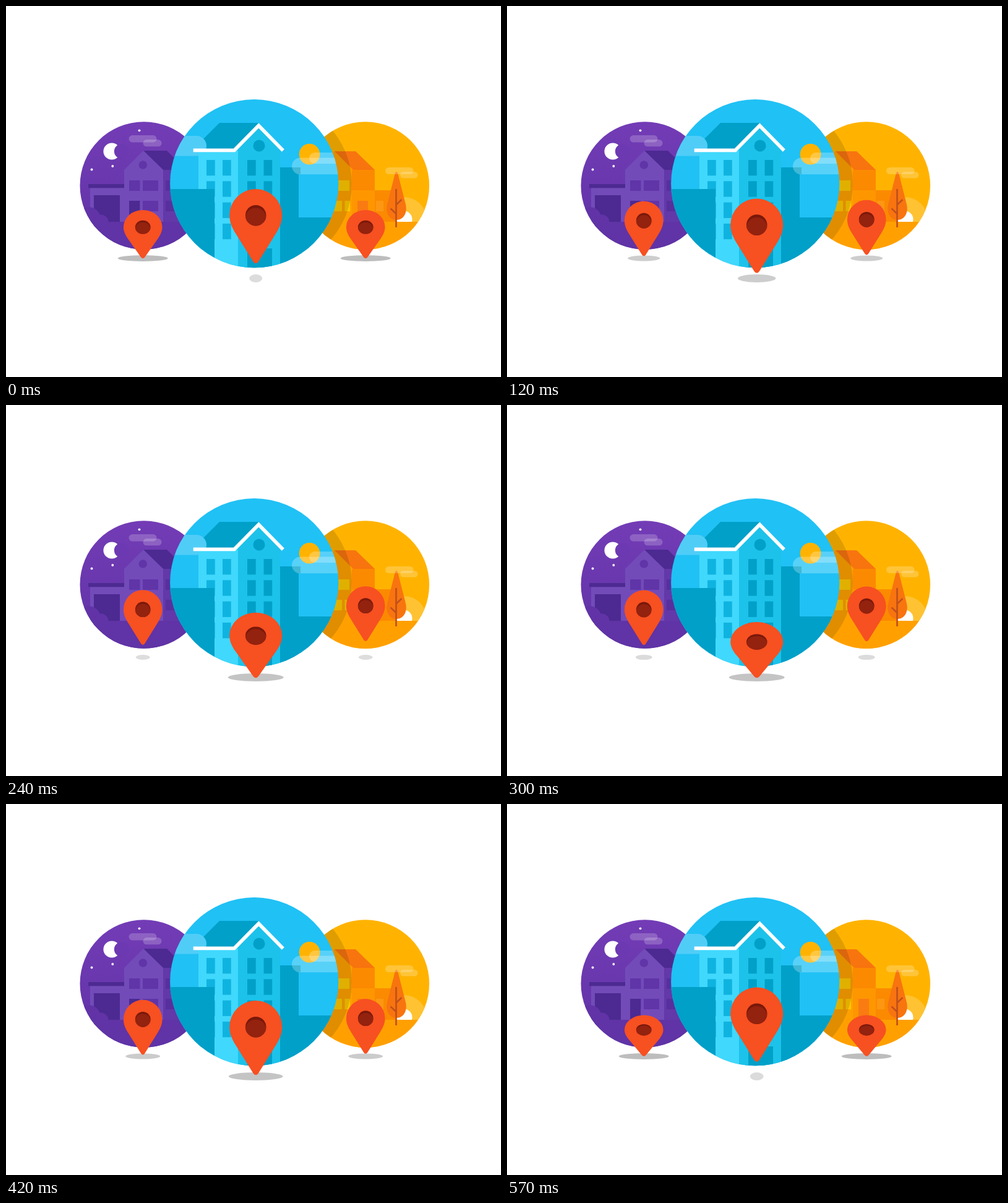
Recreate the animation shown at these times as an HTML page with a canvas. Size 800x600 px, loop 0.66 s.

```html
<!DOCTYPE html>
<html lang="en">
<head>
<meta charset="utf-8">
<title>Map pins</title>
<style>
html, body { margin: 0; width: 100%; height: 100%; overflow: hidden; background: #fff; }
canvas { display: block; width: 800px; height: 600px; }
</style>
</head>
<body>
<canvas id="stage" width="800" height="600"></canvas>
<script>
const view = document.getElementById('stage').getContext('2d');
const scene = document.createElement('canvas');
scene.width = 800;
scene.height = 600;
const c = scene.getContext('2d');

// Drawing helpers; boxes are given by their edges.
function box(x1, y1, x2, y2, color) {
  c.fillStyle = color;
  c.fillRect(x1, y1, x2 - x1, y2 - y1);
}
function disc(x, y, r, color) {
  c.fillStyle = color;
  c.beginPath();
  c.arc(x, y, r, 0, Math.PI * 2);
  c.fill();
}
function trace(pts) {
  c.beginPath();
  for (let i = 0; i < pts.length; i += 2) c.lineTo(pts[i], pts[i + 1]);
}
function poly(pts, color) {
  c.fillStyle = color;
  trace(pts);
  c.fill();
}
function line(pts, width, color) {
  c.strokeStyle = color;
  c.lineWidth = width;
  trace(pts);
  c.stroke();
}
function cloud(x, y, w, h, color) {
  c.fillStyle = color;
  c.beginPath();
  c.roundRect(x, y, w, h, h / 2);
  c.fill();
}
function inDisc(x, y, r, color, paint) {
  disc(x, y, r, color);
  c.save();
  c.beginPath();
  c.arc(x, y, r, 0, Math.PI * 2);
  c.clip();
  paint();
  c.restore();
}

function night() {
  const dark = '#4c2a91', wall = '#724bb9', pane = '#6035a8', bush = '#6133a7';
  const haze = 'rgba(255,255,255,0.2)';
  disc(171, 235, 13.6, '#fff');
  disc(186.6, 235, 11.8, '#6d39b2');
  disc(215.5, 201.3, 1.9, '#fff');
  disc(172.3, 259, 1.9, '#fff');
  disc(138.5, 264.5, 1.9, '#fff');

  box(254, 265, 330, 349, '#6338a9');
  poly([222, 234, 260, 234, 291, 265, 254, 265], dark);
  poly([191, 349, 191, 265, 222, 234, 254, 265, 254, 349], wall);
  disc(221.3, 257, 6.8, pane);
  for (const y of [282, 315]) {
    box(199, y, 216.5, y + 17, pane);
    box(221, y, 246, y + 17, pane);
    box(258, y, 276, y + 17, '#57309d');
  }
  box(199, 315, 216, 349, dark);

  box(136, 294, 191, 349, wall);
  box(133, 288, 191, 294.3, dark);
  box(142, 306, 184, 349, dark);
  disc(133, 345, 20, bush);
  disc(153.5, 349.5, 12, bush);
  box(110, 349, 330, 400, '#6033a6');

  cloud(198.5, 209, 45, 11.5, haze);
  cloud(221.5, 216, 30, 11.3, haze);
}

function autumn() {
  const roof = '#f8740f', twig = '#c0501c', glass = '#ffc800';
  const haze = 'rgba(255,255,255,0.22)';
  disc(643, 346, 37, '#ffc233');
  disc(643, 345, 13.5, '#fff');
  box(596, 298, 631, 349, '#fb8a00');
  box(598, 315, 610, 332, '#fd9712');
  poly([480, 349, 480, 265, 531, 235, 562, 265, 562, 349], '#ffa000');
  poly([531, 235, 565, 235, 596, 265, 561, 265], roof);
  box(559, 265, 596, 298, '#fb8a00');
  box(559, 298, 596, 349, '#fe9600');
  box(537, 282, 555, 299, glass);
  box(525, 315, 543, 332, glass);
  box(547.5, 315, 556, 332, glass);
  box(568, 315, 585, 349, '#f97b12');
  box(470, 349, 690, 400, '#ffa000');

  c.fillStyle = roof;
  c.beginPath();
  c.moveTo(631, 268);
  c.quadraticCurveTo(632.5, 268, 633.5, 272);
  c.lineTo(645.5, 319);
  c.bezierCurveTo(650, 335, 642, 346, 631, 346);
  c.bezierCurveTo(620, 346, 612, 335, 616.5, 319);
  c.lineTo(628.5, 272);
  c.quadraticCurveTo(629.5, 268, 631, 268);
  c.fill();
  line([630.5, 296, 630.5, 358], 2.7, twig);
  line([630.5, 321.5, 639.5, 313], 2.5, twig);
  line([630.5, 336, 621.5, 327.5], 2.5, twig);

  cloud(613, 261, 45.5, 11, haze);
  cloud(637, 268, 28.5, 10.5, haze);
  disc(423, 288, 136, 'rgba(0,0,0,0.12)');
}

function day() {
  const dark = '#00a0c8', shade = '#0fb3e0', haze = 'rgba(255,255,255,0.25)';
  poly([345, 189, 409, 189, 371, 232, 302, 232], dark);
  cloud(230, 210, 94, 32.5, '#50cdf7');
  box(311, 234, 375, 430, '#40d8fc');
  poly([375, 430, 375, 229, 409, 195, 443, 229, 443, 430], '#1cc2ea');
  for (let row = 0; row < 4; row++) {
    const y = 249 + 34.3 * row;
    for (const x of [324, 350]) box(x, y, x + 13.7, y + 25.3, shade);
    for (const x of [390, 416.5]) box(x, y, x + 13.7, y + 25.3, dark);
  }
  box(260, 296, 337, 430, dark);
  box(390, 392, 430, 430, dark);
  disc(409, 226, 9.5, dark);

  box(443, 261, 476, 272, dark);
  box(443, 271, 473, 430, dark);
  box(443, 342, 545, 430, dark);
  disc(490.5, 239.7, 16.9, '#ffb300');
  cloud(462, 245.5, 108, 26.8, haze);
  cloud(490, 237, 80, 18, haze);

  line([302.7, 233.3, 369, 233.3, 408.3, 193.4, 447.8, 233.7], 5.7, '#fff');
}

function paintScene() {
  box(0, 0, 800, 600, '#fff');
  const sky = c.createLinearGradient(0, 187, 0, 394);
  sky.addColorStop(0, '#733cb6');
  sky.addColorStop(1, '#5f32a5');
  inDisc(222.8, 290.5, 103.3, sky, night);
  inDisc(580.8, 290.6, 103.3, '#ffb300', autumn);
  inDisc(401.2, 287.2, 136.1, '#20c1f5', day);
}

const LOOP = 660, STEP = 30, LAST = 570;
const CYCLE = 625; // length of one bounce; the loop rests for what remains

// Time between t and the nearest moment mid of the bounce.
function gap(t, mid) {
  const d = Math.abs(t - mid);
  return Math.min(d, CYCLE - d);
}
// 0 to 1 as d goes from a to b, in either direction.
function ramp(d, a, b) {
  return Math.max(0, Math.min(1, (d - a) / (b - a)));
}

// Heights, squash and shadow widths all follow the distance from a key moment.
const middle = {
  x: 403.7, size: 1, floor: 441.2, shadowY: 440.5,
  lift: t => 25 * ramp(gap(t, 293), 106, 281),
  squash: t => 0.75 + 0.25 * ramp(gap(t, 300), 0, 117),
  spread: t => 45 - 34.5 * ramp(gap(t, 300), 115, 272),
  thick: () => 6.4,
  grey: w => 227 - 0.7 * w
};
function sidePin(x, height, rest) {
  return {
    x, size: 0.737, floor: 408, shadowY: 408,
    lift: t => height * ramp(gap(t, 266), rest, 32),
    squash: t => 0.75 + 0.25 * ramp(gap(t, 570), 0, 105),
    spread: t => 11.5 + 29 * ramp(gap(t, 262), 22, 262),
    thick: w => 4 + (w - 11.5) / 29,
    grey: w => 234 - 1.1 * w
  };
}
const pins = [sidePin(221.2, 20.2, 172), sidePin(581.2, 26.2, 177), middle];

function drawShadow(p, t) {
  const w = p.spread(t), g = Math.round(p.grey(w));
  view.fillStyle = `rgb(${g},${g},${g + 1})`;
  view.beginPath();
  view.ellipse(p.x, p.shadowY, w, p.thick(w), 0, 0, Math.PI * 2);
  view.fill();
}

function drawPin(p, t) {
  view.save();
  view.translate(p.x, p.floor - p.lift(t));
  view.scale(p.size, p.size * p.squash(t));

  view.fillStyle = '#f75021';
  view.beginPath();
  view.arc(0, -77.7, 42.5, Math.PI, 0);
  view.bezierCurveTo(42.5, -66, 37.5, -56, 32, -47.5);
  view.lineTo(4, -2.5);
  view.quadraticCurveTo(0, 2.5, -4, -2.5);
  view.lineTo(-32, -47.5);
  view.bezierCurveTo(-37.5, -56, -42.5, -66, -42.5, -77.7);
  view.fill();

  view.beginPath();
  view.arc(0, -77.5, 16.8, 0, Math.PI * 2);
  view.fillStyle = '#7a180a';
  view.fill();
  view.clip();
  view.beginPath();
  view.arc(0, -73, 16.8, 0, Math.PI * 2);
  view.fillStyle = '#93220f';
  view.fill();
  view.restore();
}

let start = null;

function frame(now) {
  if (start === null) start = now;
  const t = Math.min(LAST, Math.floor(((now - start) % LOOP) / STEP) * STEP);
  view.drawImage(scene, 0, 0);
  for (const p of pins) drawShadow(p, t);
  for (const p of pins) drawPin(p, t);
  requestAnimationFrame(frame);
}

paintScene();
requestAnimationFrame(frame);
</script>
</body>
</html>
```
